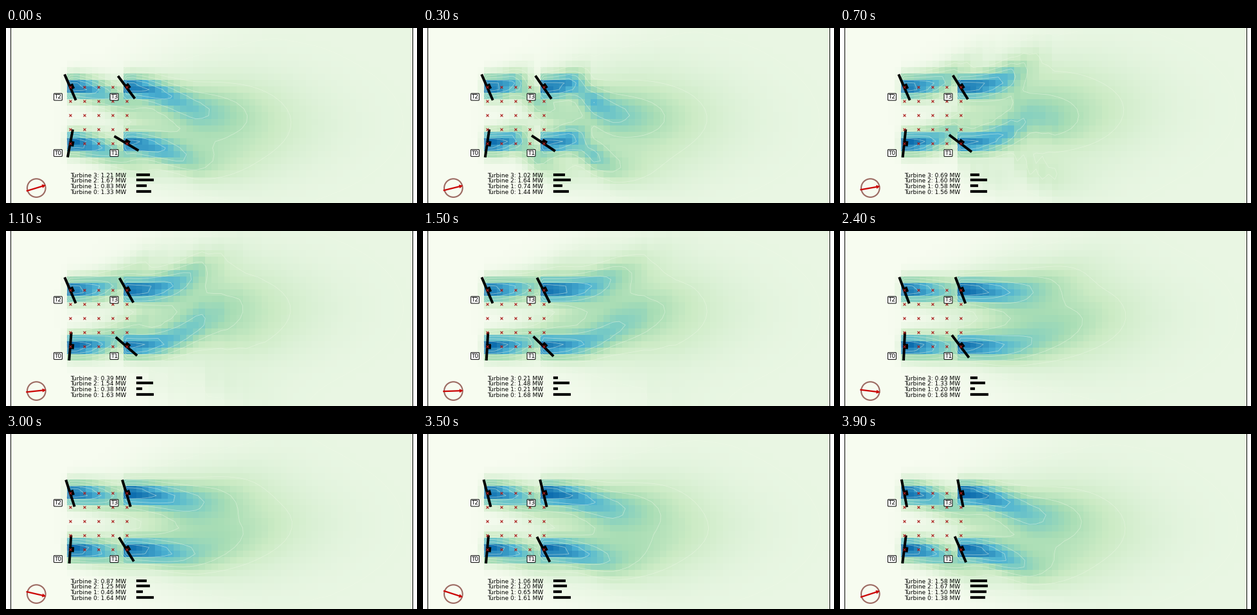
Recreate the animation shown at these times as a matplotlib script. Size 640 by 273 pixels, loop 4 s.

```python
import numpy as np
import matplotlib.pyplot as plt
from matplotlib.animation import FuncAnimation
from matplotlib.patches import Circle, Polygon

W, H, DPI = 640, 273, 100
FRAMES, INTERVAL = 40, 100
PT = 72 / DPI  # points per pixel
LEFT, RIGHT = 7, 633
NX, NY = 64, 27
SPAN = 87.5  # distance between turbines
RED = "#cc0808"

# x, y, yaw in degrees after t seconds, time of the deepest wake loss
TURBINES = [
    (100, 180, lambda t: -2.5 - 1.65 * (t - 2.2) ** 2, None),
    (100 + SPAN, 180, lambda t: 59.3 - 9.2 * t, 1.95),
    (100, 180 - SPAN, lambda t: 23.5 - 0.21 * t ** 3, None),
    (100 + SPAN, 180 - SPAN, lambda t: 36.6 - 6.5 * t, 1.65),
]

dx, dy = (RIGHT - LEFT) / NX, H / NY
X, Y = np.meshgrid(LEFT + dx * (np.arange(NX) + 0.5), dy * (np.arange(NY) + 0.5))


def wind(t):
    """Wind angle: turns steadily, then jumps back once per loop."""
    return 18 - 10 * ((t + 0.101) % 4)


def power(t, yaw, dip):
    loss = 0 if dip is None else 0.86 * np.exp(-0.5 * ((t - dip) / 0.95) ** 2)
    return 1.69 * np.cos(np.radians(yaw - wind(t))) ** 2 * (1 - loss)


def bell(v, width):
    return np.exp(-0.5 * (v / width) ** 2)


def wake(t, x, y, yaw):
    """Parcels keep the wind angle they started with; speeds vary a little."""
    s = X - x
    run = np.maximum(s, 0)
    start = np.where(s > -6, 1, np.where(s > -16, 0.08, 0))
    reach = 88 if x == 100 else 105
    fade = (0.9 - abs(yaw) / 400) * np.exp(-(run / reach) ** 1.6)
    bend = run * np.minimum(run, 110) / 100
    across = np.mean([
        bell(Y - y + bend * np.tan(np.radians(wind(t - run / speed))), 13 + 0.05 * run)
        for speed in (100, 125, 150, 175)
    ], axis=0)
    return start * fade * across


def deficit(t):
    wakes = [wake(t, x, y - 0.5, yaw(t)) for x, y, yaw, _ in TURBINES]
    near = sum(w ** 2.5 for w in wakes) ** 0.4
    along = bell(X - 305, np.where(X < 305, 78, 110))
    far = 0.29 * along * np.mean(
        [bell(Y - 133 + wind(t - lag), 50) for lag in (0.2, 0.5, 0.8, 1.1)], axis=0)
    ramp = np.clip((X - 60 - 0.7 * abs(Y - 140)) / 280, 0, 1)
    base = 0.075 * ramp * ramp * (3 - 2 * ramp)
    return np.minimum(near + (far + base) * (1 - 0.85 * near), 0.95)


def turned(points, x, y, degrees):
    a = np.radians(degrees)
    u, v = np.array(points, float).T
    return np.c_[x + u * np.cos(a) + v * np.sin(a), y - u * np.sin(a) + v * np.cos(a)]


fig = plt.figure(figsize=(W / DPI, H / DPI), dpi=DPI, facecolor="white")
ax = fig.add_axes([0, 0, 1, 1])
ax.axis("off")

field = ax.imshow(deficit(0), cmap="GnBu", vmin=0, vmax=1, aspect="auto",
                  interpolation="nearest", extent=(LEFT, RIGHT, H, 0))
ax.set(xlim=(0, W), ylim=(H, 0))
ax.set_autoscale_on(False)
for x in (LEFT, RIGHT):
    ax.plot([x, x], [0, H], color="black", lw=PT, zorder=3)

ROTOR = [(-2, -22), (2, -22), (2, 22), (-2, 22)]
NACELLE = [(0, -4), (6, -4), (6, 4), (0, 4)]
rotors, nacelles, bars, labels = [], [], [], []
for i, (x, y, _, _) in enumerate(TURBINES):
    for shape, group in ((ROTOR, rotors), (NACELLE, nacelles)):
        group.append(ax.add_patch(Polygon(shape, color="black", lw=0, zorder=4)))
    ax.text(x - 19, y + 15, f"T{i}", fontsize=6.48, ha="center", va="center", zorder=7,
            bbox=dict(boxstyle="round,pad=0.1", fc="white", ec="black", lw=PT))
    row = 3 - i
    labels.append(ax.text(100.3, 232.6 + 8.65 * row, "", fontsize=6.48, zorder=7))
    bars.append(ax.plot([], [], color="black", lw=4.2 * PT, zorder=7,
                        solid_capstyle="projecting")[0])

steps = np.linspace(0, SPAN, 5)
gx, gy = np.meshgrid(100 + steps, 92 + steps)
ax.plot(gx.ravel(), gy.ravel(), "x", color="#aa1c1c", ms=4.3 * PT, mew=1.1 * PT, zorder=6)

DIAL = (47.3, 249.6)
ax.add_patch(Circle(DIAL, 14.3, fill=False, ec="#9c6a62", lw=2.1 * PT, zorder=5))
shaft, = ax.plot([], [], color=RED, lw=2.3 * PT, zorder=6)
head = ax.add_patch(Polygon([(0, 0), (1, 0), (0, 1)], color=RED, lw=0, zorder=6))

lines = []


def draw(frame):
    t = frame * INTERVAL / 1000
    values = deficit(t)
    field.set_data(values)
    while lines:
        lines.pop().remove()
    lines.append(ax.contour(X, Y, values, levels=np.arange(0.08, 0.95, 0.13),
                            colors="#f0f9e8", alpha=0.5, linewidths=0.8 * PT, zorder=2))
    for i, (x, y, yaw, dip) in enumerate(TURBINES):
        angle = yaw(t)
        output = power(t, angle, dip)
        rotors[i].set_xy(turned(ROTOR, x, y, angle))
        nacelles[i].set_xy(turned(NACELLE, x, y, angle))
        labels[i].set_text(f"Turbine {i}: {output:.2f} MW")
        level = 228.8 + 8.65 * (3 - i)
        bars[i].set_data([205, 205 + 14 * output], [level, level])
    shaft.set_data(*turned([(-15, 0), (11, 0)], *DIAL, wind(t)).T)
    head.set_xy(turned([(15.5, 0), (9.5, -3), (9.5, 3)], *DIAL, wind(t)))
    return []


anim = FuncAnimation(fig, draw, frames=FRAMES, interval=INTERVAL, repeat=True,
                     repeat_delay=0, init_func=lambda: draw(0))
plt.show()
```
